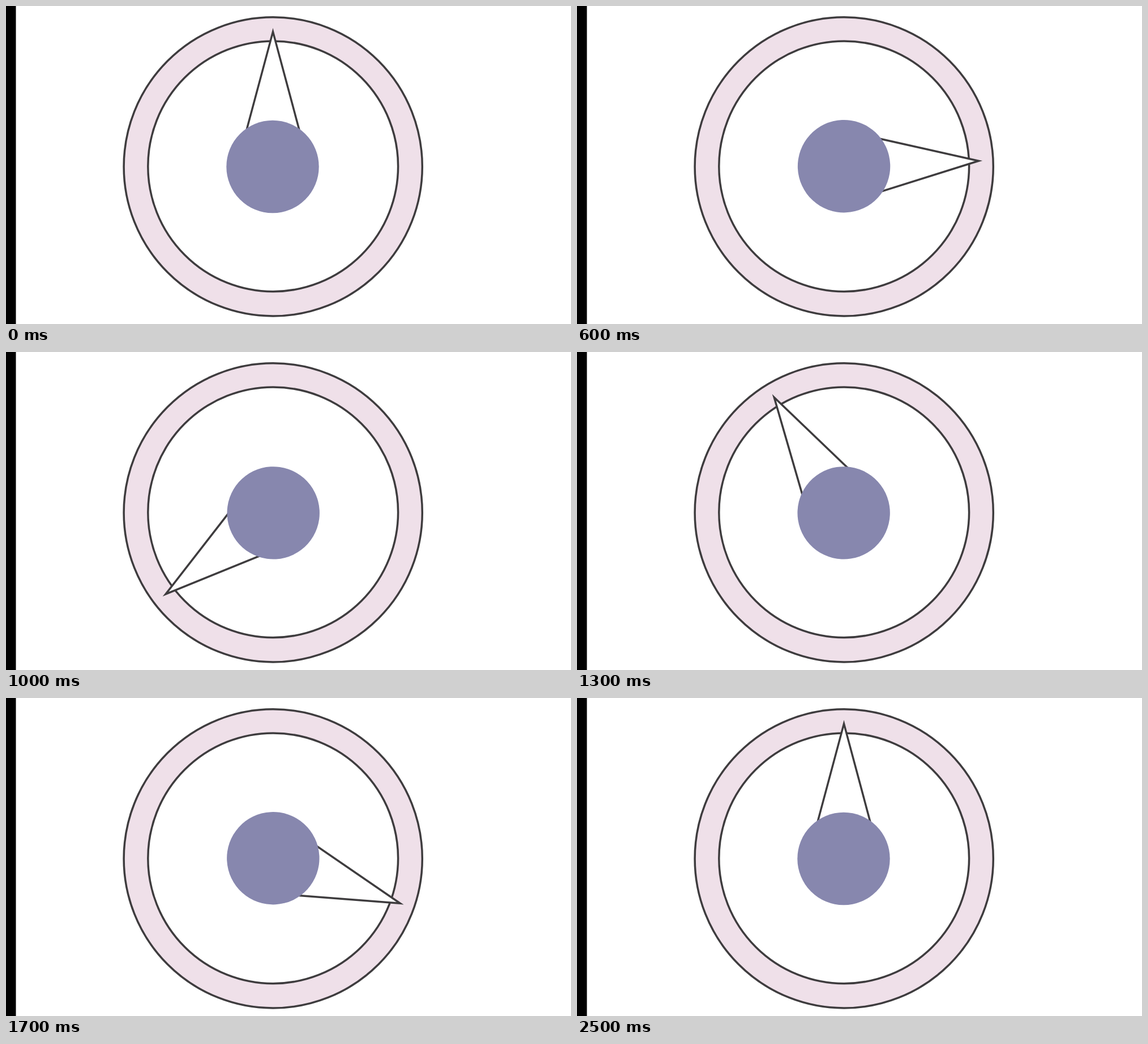
Animation of 998 by 561 pixels, one loop 2.7 s. Source, as an HTML page:

```html
<!DOCTYPE html>
<html lang="en">
<head>
<meta charset="utf-8">
<title>Spinning pointer</title>
<style>
  html, body { margin: 0; width: 100%; height: 100%; overflow: hidden; background: #fff; }
  svg { display: block; width: 998px; height: 561px; }
  .line { stroke: #3e3c3e; stroke-width: 3.5; stroke-miterlimit: 10; }
</style>
</head>
<body>
<svg viewBox="0 0 998 561">
  <rect width="17.5" height="561"/>
  <circle class="line" cx="471.7" cy="283.4" r="263.6" fill="#efe0e9"/>
  <circle class="line" cx="471.7" cy="282.8" r="220.9" fill="#fff"/>
  <g id="pointer">
    <path class="line" d="M-51.2 -48 L-0.2 -238 L50.8 -48" fill="#fff"/>
    <circle cx="-0.7" cy="0.1" r="81.7" fill="#8787ae"/>
  </g>
</svg>
<script>
  const LOOP = 2700, STEP = 100, LAST = 24;
  // [step, degrees]: two turns, gathering speed first and slowing down last
  const KEYS = [[0, 0], [5, 87.6], [9, 232.9], [12, 328.8], [16, 469.4], [20, 619.6], [LAST, 720]];
  const pointer = document.getElementById("pointer");

  function angleAt(step) {
    const i = Math.max(1, KEYS.findIndex(key => step <= key[0]));
    const [s0, a0] = KEYS[i - 1], [s1, a1] = KEYS[i];
    let u = (step - s0) / (s1 - s0);
    if (i === 1) u = u * u;
    if (i === KEYS.length - 1) u = 1 - Math.pow(1 - u, 1.6);
    return a0 + (a1 - a0) * u;
  }

  function draw() {
    const time = performance.now() % LOOP;
    const step = Math.min(LAST, Math.max(0, Math.floor(time / STEP) - 1));
    pointer.setAttribute("transform", `translate(471.7 283.4) rotate(${angleAt(step)})`);
    requestAnimationFrame(draw);
  }
  draw();
</script>
</body>
</html>
```
